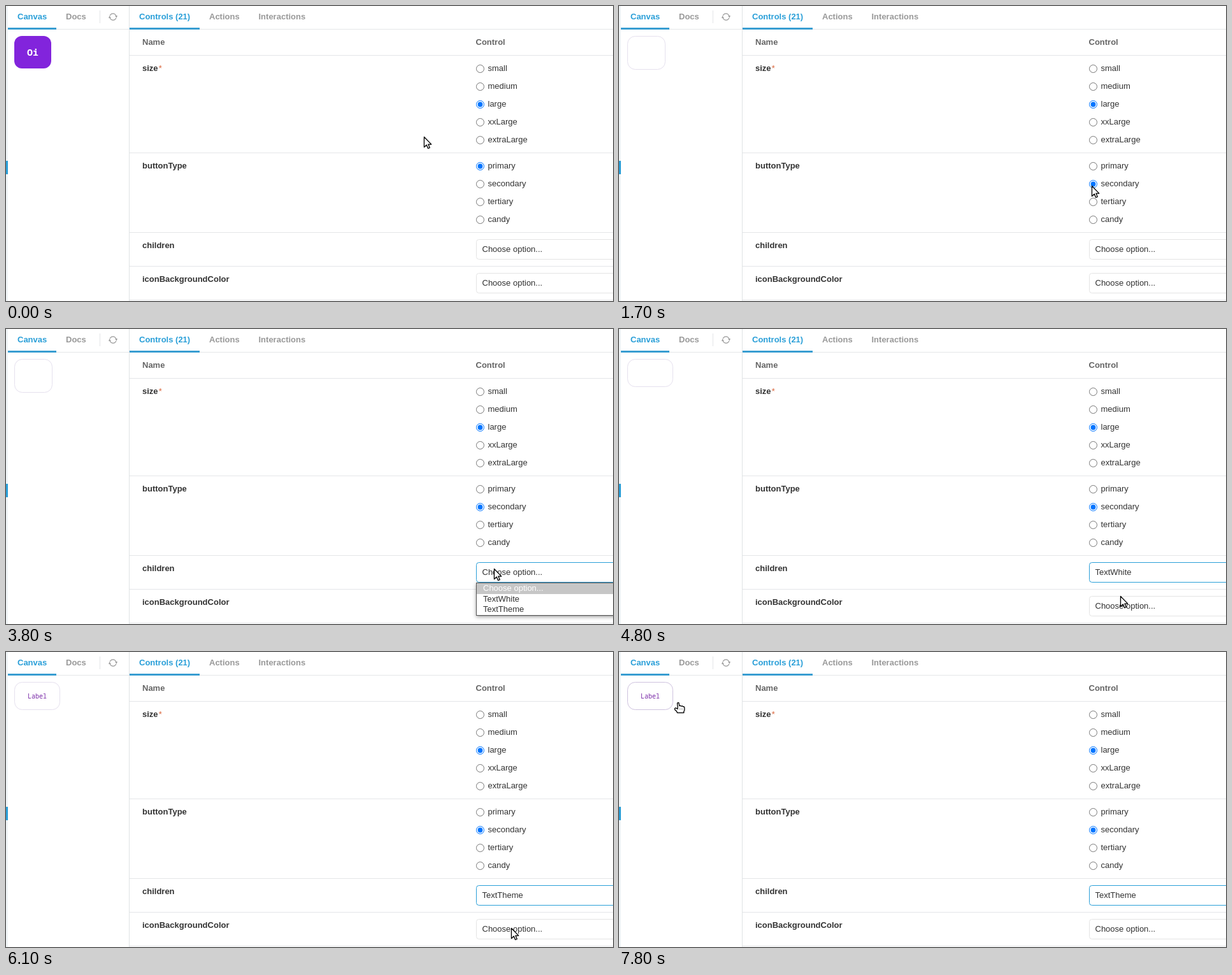
These frames come from a looping animation (953 px wide and 463 px high, 8 s). An HTML page with a canvas:

```html
<!DOCTYPE html>
<html lang="en">
<head>
<meta charset="utf-8">
<title>Button controls</title>
<style>
  html, body { margin: 0; width: 100%; height: 100%; overflow: hidden; background: #fff; }
  canvas { display: block; }
</style>
</head>
<body>
<canvas id="stage" width="953" height="463"></canvas>
<script>
const ctx = document.getElementById('stage').getContext('2d');
const LOOP = 8000, STEP = 100;
const BLUE = '#2a9fd8', LINE = '#e4e6e8', INK = '#333';
const SANS = '13px "Liberation Sans", sans-serif';
const BOLD = 'bold ' + SANS;

// Pointer moves: start, end, x, y
const START = [656, 205];
const MOVES = [
  [100, 200, 651, 204], [300, 400, 638, 205],
  [500, 1000, 780, 272], [1000, 1200, 819, 287], [1200, 1500, 742, 282],
  [1800, 2500, 30, 65], [2600, 3200, 766, 376],
  [4000, 4100, 775, 388], [4200, 4400, 787, 419],
  [5200, 5300, 789, 402], [5400, 5500, 788, 386],
  [5800, 5900, 790, 431], [6000, 6300, 803, 439],
  [6500, 6900, 96, 72], [6900, 7200, 50, 70],
  [7200, 7500, 109, 84], [7500, 7800, 93, 79]
];

const ramp = (t, a, b) => Math.max(0, Math.min(1, (t - a) / (b - a)));
const ease = p => p * p * (3 - 2 * p);
const within = (t, a, b) => t >= a && t < b;
const mix = (a, b, p) => 'rgb(' + a.map((v, i) => Math.round(v + (b[i] - v) * p)) + ')';

function pointerAt(t) {
  let [x, y] = START;
  for (const [a, b, tx, ty] of MOVES) {
    const p = ease(ramp(t, a, b));
    x += (tx - x) * p;
    y += (ty - y) * p;
  }
  return [Math.round(x), Math.round(y)];
}

function rect(x, y, w, h, color) {
  ctx.fillStyle = color;
  ctx.fillRect(x, y, w, h);
}

function text(str, x, y, color = INK, font = SANS) {
  ctx.font = font;
  ctx.fillStyle = color;
  ctx.fillText(str, x, y);
}

function box(x, y, w, h, r, fill, stroke) {
  ctx.beginPath();
  ctx.roundRect(x, y, w, h, r);
  ctx.fillStyle = fill;
  ctx.fill();
  if (!stroke) return;
  ctx.strokeStyle = stroke;
  ctx.lineWidth = 1;
  ctx.stroke();
}

function radio(label, y, checked, hovered) {
  const color = checked ? '#0075ff' : hovered ? '#4f4f4f' : '#767676';
  ctx.beginPath();
  ctx.arc(744.5, y + .5, 6, 0, 7);
  ctx.strokeStyle = color;
  ctx.lineWidth = 1;
  ctx.stroke();
  if (checked) {
    ctx.beginPath();
    ctx.arc(744.5, y + .5, 3.9, 0, 7);
    ctx.fillStyle = color;
    ctx.fill();
  }
  text(label, 756.5, y + 4);
}

function radioGroup(labels, top, selected, [px, py]) {
  labels.forEach((label, i) => {
    const y = top + i * 28;
    const right = 757 + label.length * 7;
    const hovered = px >= 738 && px <= right && Math.abs(py - y) < 10;
    radio(label, y, i === selected, hovered);
  });
}

function select(value, y, focused) {
  box(738.5, y + .5, 240, 31, 4, '#fff', focused ? BLUE : '#e4e4e4');
  text(value, 747.5, y + 20);
}

function refreshIcon() {
  ctx.strokeStyle = ctx.fillStyle = '#999';
  ctx.lineWidth = 1.2;
  for (const turn of [0, Math.PI]) {
    ctx.save();
    ctx.translate(168, 17);
    ctx.rotate(turn);
    ctx.beginPath();
    ctx.arc(0, 0, 5.2, Math.PI * 1.1, Math.PI * 1.9);
    ctx.stroke();
    ctx.beginPath();
    ctx.moveTo(3, -1.8);
    ctx.lineTo(7, -1.8);
    ctx.lineTo(5.6, 1.4);
    ctx.fill();
    ctx.restore();
  }
}

function frame() {
  rect(0, 0, 953, 463, '#fff');
  rect(0, 0, 3, 463, '#f1f5f7');
  rect(0, 243, 3, 21, BLUE);
  rect(3, 36, 950, 1, LINE);
  rect(193, 0, 1, 463, '#dfe2e4');
  rect(147, 7, 1, 20, LINE);
  rect(3, 34, 76, 3, '#389dd1');
  rect(194, 34, 110, 3, '#389dd1');
  for (const y of [77, 230, 355, 408, 461]) rect(194, y, 759, 1, LINE);

  text('Canvas', 18, 21, BLUE, BOLD);
  text('Docs', 94, 21, '#999', BOLD);
  text('Controls (21)', 209, 21, BLUE, BOLD);
  text('Actions', 319, 21, '#999', BOLD);
  text('Interactions', 396.5, 21, '#999', BOLD);
  refreshIcon();

  text('Name', 214, 61, '#666', BOLD);
  text('Control', 737.5, 61, '#666', BOLD);
  text('size', 214, 102, INK, BOLD);
  text('*', 239.7, 102, '#d9653b');
  text('buttonType', 214, 255, INK, BOLD);
  text('children', 214, 380, INK, BOLD);
  text('iconBackgroundColor', 214, 433, INK, BOLD);
}

function previewButton(t) {
  const mono = size => size + ' "Noto Sans Mono", monospace';
  if (t < 1500) {
    box(13, 47, 58, 51, 12, '#8224dc');
    text('Oi', 33, 78, '#fff', mono('600 15px'));
    return;
  }
  const fade = ramp(t, 1400, 1700);
  const hover = ramp(t, 2300, 2500) - ramp(t, 2700, 2900)
    + ramp(t, 6600, 6900) - .35 * ramp(t, 7500, 7800);
  const fill = mix([130, 36, 220], [255, 255, 255], fade);
  const edge = mix([229, 224, 238], [193, 178, 214], hover);
  if (t < 4800) {
    box(13.5, 47.5, 59, 52, 12, fill, edge);
    text('Oi', 34, 79, '#fff', mono('600 15px'));
  } else {
    box(13.5, 47.5, 71, 43, 12, fill, edge);
    text('Label', 34, 73, t < 6100 ? '#fff' : '#7a2aa8', mono('10px'));
  }
}

function menu(active) {
  ctx.save();
  ctx.shadowColor = 'rgba(0,0,0,.35)';
  ctx.shadowBlur = 6;
  ctx.shadowOffsetY = 2;
  rect(738, 398, 240, 52, '#555');
  ctx.restore();
  rect(739, 399, 240, 50, '#fff');
  const tops = [399, 416, 432, 449];
  rect(739, tops[active], 240, tops[active + 1] - tops[active], active ? '#1e90ff' : '#c6c6c6');
  ['Choose option...', 'TextWhite', 'TextTheme'].forEach((label, i) => {
    const color = i === active ? '#fff' : i ? INK : '#808080';
    text(label, 749, [411, 428, 444][i], color);
  });
}

function outline(points, x, y) {
  ctx.save();
  ctx.translate(x + .5, y + .5);
  ctx.beginPath();
  points.forEach(([px, py]) => ctx.lineTo(px, py));
  ctx.closePath();
  ctx.lineJoin = 'round';
  ctx.shadowColor = 'rgba(0,0,0,.3)';
  ctx.shadowBlur = 2;
  ctx.shadowOffsetY = 1;
  ctx.fillStyle = '#fff';
  ctx.fill();
  ctx.shadowColor = 'transparent';
  ctx.strokeStyle = '#000';
  ctx.lineWidth = 1.3;
  ctx.stroke();
  ctx.restore();
}

const ARROW = [[0, 0], [0, 16], [3.8, 12.5], [6.2, 18], [8.8, 17], [6.4, 11.6], [11.3, 11.6]];
const HAND = [
  [-2, 1], [-1, 0], [.4, .2], [1.3, 5], [3, 4.6], [4, 5.6], [6, 5.2], [7, 6.4],
  [8.4, 6.2], [9.3, 7.6], [9.3, 12], [8.3, 13.5], [8.3, 15.8], [-2, 15.8],
  [-3, 13.5], [-5.8, 11], [-6, 9], [-4.4, 8.2], [-2, 9.8], [-1.2, 7.5]
];

function pointer([x, y]) {
  if (x > 125 || y > 105) return outline(ARROW, x, y);
  outline(HAND, x, y);
  for (let i = 0; i < 4; i++) rect(x - 1 + i * 2.5, y + 10, 1, 1, '#444');
}

function draw(now) {
  const t = Math.floor(now % LOOP / STEP) * STEP;
  const at = pointerAt(t);
  frame();
  previewButton(t);
  radioGroup(['small', 'medium', 'large', 'xxLarge', 'extraLarge'], 98, 2, at);
  radioGroup(['primary', 'secondary', 'tertiary', 'candy'], 251, t < 1500 ? 0 : 1, at);
  const child = t < 4800 ? 'Choose option...' : t < 6100 ? 'TextWhite' : 'TextTheme';
  select(child, 366, t >= 3800);
  select('Choose option...', 419, false);
  if (within(t, 3800, 4800)) menu(t < 4300 ? 0 : 1);
  if (within(t, 5500, 6100)) menu(t < 5900 ? 1 : 2);
  pointer(at);
}

const begin = performance.now();
function tick() {
  draw(performance.now() - begin);
  requestAnimationFrame(tick);
}
tick();
</script>
</body>
</html>
```
